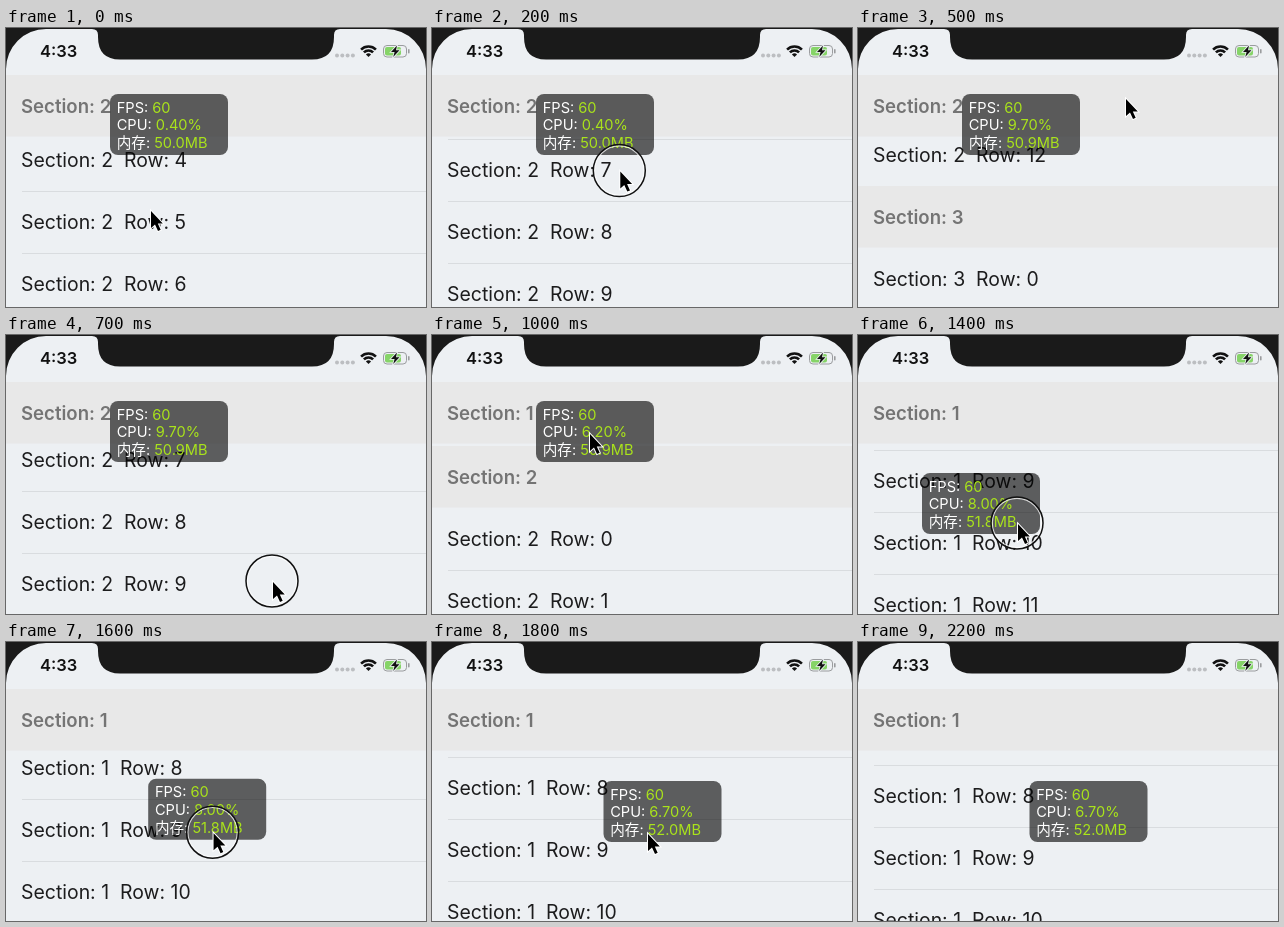
These frames come from a looping animation (420 px wide and 279 px high, 2300 ms). An HTML page with a canvas:

```html
<!DOCTYPE html>
<html lang="zh">
<head>
<meta charset="utf-8">
<style>
html, body { margin: 0; width: 420px; height: 279px; overflow: hidden; background: #1a1a1a; }
canvas { display: block; }
</style>
</head>
<body>
<canvas id="stage" width="420" height="279"></canvas>
<script>
const ctx = document.getElementById('stage').getContext('2d');
const LOOP = 2300, STEP = 100, PITCH = 62, ROWS = 13;
const PAPER = '#edf0f3', BLACK = '#1a1a1a', LIME = '#a9e31b';
const FONT = 'px Inter, "Noto Sans CJK SC", "Noto Sans CJK", sans-serif';

// Keys are [time, value]; scroll is the centre of the "Section: 2" header.
const scroll = [[0, -178], [500, -679], [700, -371], [1000, 142], [1400, 394], [1800, 456], [2200, 464]];
const cursorX = [[0, 144], [500, 267], [700, 266], [1000, 157], [1100, 147.5], [1300, 107.5], [1400, 159], [1700, 215]];
const cursorY = [[0, 182], [500, 70], [700, 246], [1000, 98], [1100, 118], [1300, 190], [1400, 188], [1700, 191]];
const presses = [[100, 300], [600, 700], [1100, 1600]];
const cpu = [[0, '0.40%'], [300, '9.70%'], [900, '6.20%'], [1300, '8.00%'], [1700, '6.70%']];
const memory = [[0, '50.0MB'], [300, '50.9MB'], [1300, '51.8MB'], [1700, '52.0MB']];

const latest = (keys, t) => keys.filter(k => k[0] <= t).pop()[1];

// Smooth interpolation that never overshoots its keys.
function ease(keys, t) {
  const last = keys.length - 1;
  if (t >= keys[last][0]) return keys[last][1];
  const i = keys.findIndex(k => k[0] > t) - 1;
  const rate = j => (keys[j + 1][1] - keys[j][1]) / (keys[j + 1][0] - keys[j][0]);
  const slope = j => {
    if (j === 0 || j === last) return 0;
    const a = rate(j - 1), b = rate(j);
    return a * b > 0 ? 2 * a * b / (a + b) : 0;
  };
  const [t0, v0] = keys[i], [t1, v1] = keys[i + 1];
  const d = t1 - t0, u = (t - t0) / d, w = 1 - u;
  return v0 * w * w * (1 + 2 * u) + v1 * u * u * (3 - 2 * u)
    + d * u * w * (slope(i) * w - slope(i + 1) * u);
}

function text(str, x, y, size, color, weight = 400) {
  ctx.font = weight + ' ' + size + FONT;
  ctx.fillStyle = color;
  ctx.fillText(str, x, y);
  return x + ctx.measureText(str).width;
}

function rect(x, y, w, h, color) {
  ctx.fillStyle = color;
  ctx.fillRect(x, y, w, h);
}

function rounded(x, y, w, h, r, color) {
  ctx.fillStyle = color;
  ctx.beginPath();
  ctx.roundRect(x, y, w, h, r);
  ctx.fill();
}

function ring(x, y, r, color, width) {
  ctx.strokeStyle = color;
  ctx.lineWidth = width;
  ctx.beginPath();
  ctx.arc(x, y, r, 0, 7);
  ctx.stroke();
}

function header(section, y) {
  rect(0, y - 31, 420, 61.5, '#e8e8e8');
  text('Section: ' + section, 15, y + 6.5, 18.6, '#747474', 600);
}

function list(pos) {
  const span = PITCH * (ROWS + 1);
  const top = s => pos + (s - 2) * span;
  for (let s = 1; s <= 3; s++) {
    for (let row = 0; row < ROWS; row++) {
      const y = top(s) + PITCH * (row + 1);
      if (y < 30 || y > 320) continue;
      text(`Section: ${s}  Row: ${row}`, 15, y + 7, 19.45, '#1c1c1d');
      rect(16, Math.round(y + 31), 404, 1, '#d9dcdf');
    }
  }
  for (let s = 1; s <= 3; s++) {
    const end = top(s + 1) - PITCH;
    const y = Math.min(Math.max(top(s), 78), Math.max(end, top(s)));
    if (y > 0 && y < 320) header(s, y);
  }
}

function statusBar() {
  rect(0, 0, 420, 47, PAPER);
  text('4:33', 34, 29, 16.5, '#111', 600);
  for (let i = 0; i < 4; i++) {
    ctx.fillStyle = '#bcbec1';
    ctx.beginPath();
    ctx.arc(331 + i * 5.3, 27.5, 2, 0, 7);
    ctx.fill();
  }
  // Wi-Fi fan
  for (const [r, w] of [[10.5, 2.6], [6.5, 2.6], [1.8, 3.6]]) {
    ctx.strokeStyle = '#111';
    ctx.lineWidth = w;
    ctx.beginPath();
    ctx.arc(362.5, 29, r, -Math.PI * 0.75, -Math.PI * 0.25);
    ctx.stroke();
  }
  // Battery
  ctx.strokeStyle = '#9a9c9e';
  ctx.lineWidth = 1;
  ctx.beginPath();
  ctx.roundRect(377.5, 17.5, 23, 11.5, 3.5);
  ctx.stroke();
  rounded(402, 21, 1.6, 4.5, 1, '#9a9c9e');
  rounded(379, 19, 16, 8.5, 2, '#86d468');
  const bolt = new Path2D('M391 17.5L385 24H388.6L387.2 29L393.5 22.3H390Z');
  ctx.strokeStyle = PAPER;
  ctx.lineWidth = 1.6;
  ctx.stroke(bolt);
  ctx.fillStyle = '#111';
  ctx.fill(bolt);
}

function bezel() {
  ctx.fillStyle = BLACK;
  ctx.fill(new Path2D('M0 0H420V41A40 40 0 0 0 380 1H334Q328 1 328 7V9Q328 31.5 306 31.5H114Q92 31.5 92 9V7Q92 1 86 1H40A40 40 0 0 0 0 41Z'));
}

function monitor(x, y, t) {
  rounded(x, y, 118, 61, 8, 'rgba(0,0,0,0.61)');
  const lines = [['FPS: ', '60'], ['CPU: ', latest(cpu, t)], ['内存: ', latest(memory, t)]];
  lines.forEach(([label, value], i) => {
    const base = y + 18.6 + i * 17.6;
    text(value, text(label, x + 6.7, base, 14.6, '#fff'), base, 14.6, LIME);
  });
}

function pointer(x, y, pressed) {
  if (pressed) {
    ring(x, y, 24.7, 'rgba(255,255,255,0.75)', 1.2);
    ring(x, y, 26, '#111', 1.5);
  }
  ctx.save();
  ctx.translate(x + 1, y + 1);
  const arrow = new Path2D('M0 0V17L4 13.5L7 20L9.7 18.8L6.8 12.4H11.8Z');
  ctx.lineWidth = 2;
  ctx.strokeStyle = '#fff';
  ctx.stroke(arrow);
  ctx.fillStyle = '#000';
  ctx.fill(arrow);
  ctx.restore();
}

function draw(now) {
  const t = Math.floor(now % LOOP / STEP) * STEP;
  rect(0, 0, 420, 279, PAPER);
  list(ease(scroll, t));
  statusBar();
  bezel();
  // The dragged panel trails the pointer by one step.
  const held = Math.max(1100, t - STEP);
  monitor(ease(cursorX, held) - 43.5, ease(cursorY, held) - 52, t);
  if (t < 2000) {
    const pressed = presses.some(([a, b]) => t >= a && t <= b);
    pointer(ease(cursorX, t), ease(cursorY, t), pressed);
  }
  requestAnimationFrame(draw);
}
requestAnimationFrame(draw);
</script>
</body>
</html>
```
